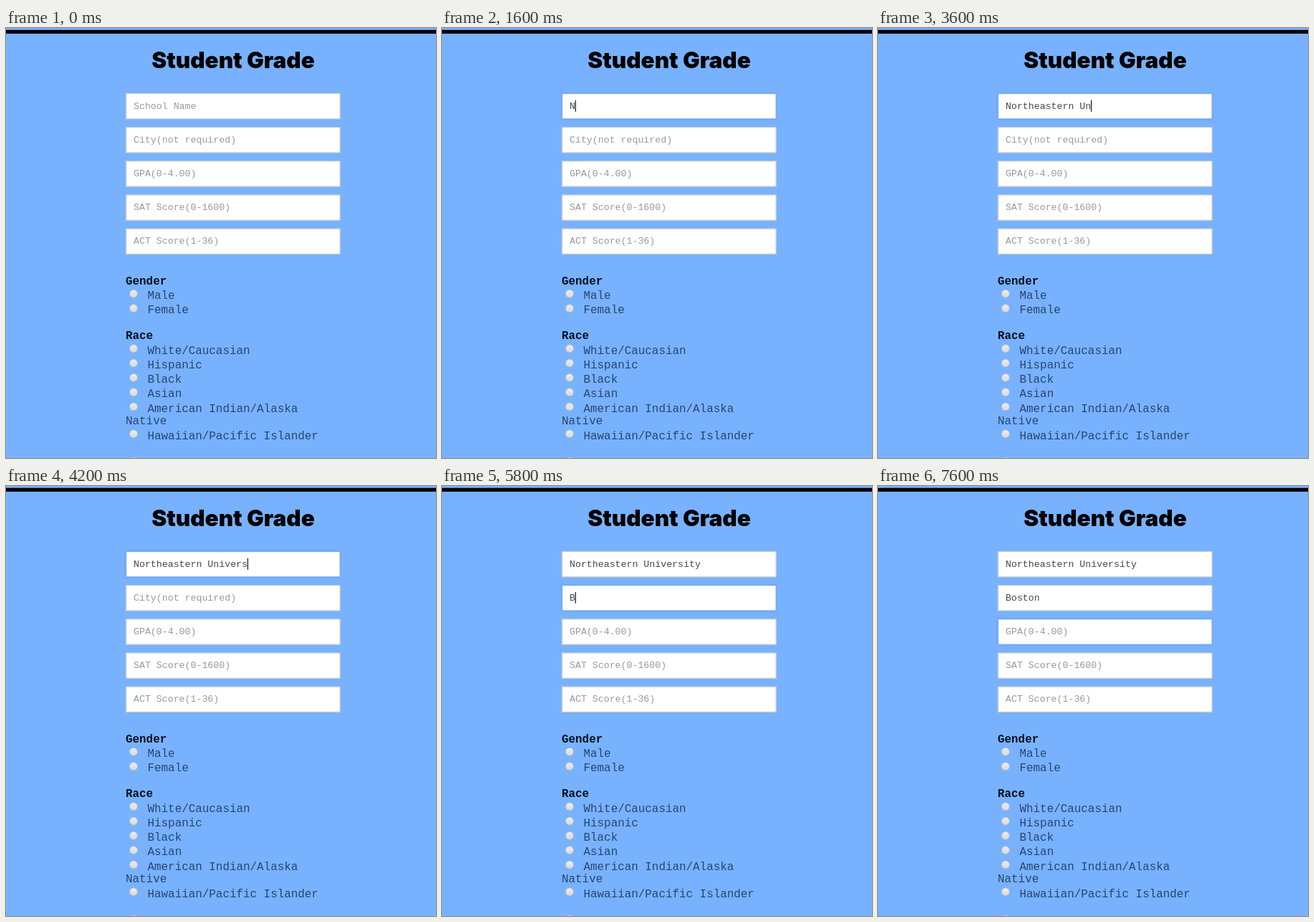
Write an HTML page that moves like this. It is 600 by 600 pixels and loops after 8000 ms.

```html
<!DOCTYPE html>
<html lang="en">
<head>
<meta charset="utf-8">
<title>Score form</title>
<style>
  html, body { margin: 0; width: 100%; height: 100%; overflow: hidden; background: #78b2ff; }
  svg { display: block; width: 600px; height: 600px; }
  text { font: 15.9px "Liberation Mono", monospace; fill: #26456e; white-space: pre; }
  .title { font: 900 31.5px Inter, sans-serif; fill: #000; text-anchor: middle; }
  .head { font-weight: bold; fill: #06101f; }
  .box { fill: #fff; stroke: #ccc; stroke-width: 1.3; }
  .focus .box { stroke: #85b0ee; filter: drop-shadow(0 0 .8px #5c92e0); }
  .value { font-size: 13.25px; fill: #484848; }
  .empty { fill: #999; }
  .radio { fill: url(#knob); stroke: #a8b3c2; stroke-width: .8; }
</style>
</head>
<body>
<svg id="stage" viewBox="0 0 600 600">
  <defs>
    <linearGradient id="knob" x2="0" y2="1">
      <stop stop-color="#eee"/><stop offset="1" stop-color="#d8d8d8"/>
    </linearGradient>
  </defs>
  <rect width="600" height="600" fill="#78b2ff"/>
  <rect y="2.7" width="600" height="5.2"/>
  <text class="title" x="317" y="56.3">Student Grade</text>
</svg>
<script>
const stage = document.getElementById('stage');
const LOOP = 8000, STEP = 200, TEXT_X = 178, CHAR = 7.95;

function add(tag, attrs, parent = stage, content = '') {
  const node = document.createElementNS('http://www.w3.org/2000/svg', tag);
  for (const key in attrs) node.setAttribute(key, attrs[key]);
  node.textContent = content;
  return parent.appendChild(node);
}
const label = (x, y, content, cls = '') => add('text', { x, y, class: cls }, stage, content);
const radio = cy => add('circle', { class: 'radio', cx: 178, cy, r: 5.6 });
function option(y, content) {
  radio(y - 7.2);
  label(197.5, y, content);
}

// start/end: focus span, typeAt: first key, rate: characters per step
const fields = [
  { hint: 'School Name', text: 'Northeastern University', start: 600, end: 4800, typeAt: 1600, rate: 1.47 },
  { hint: 'City(not required)', text: 'Boston', start: 4800, end: 7000, typeAt: 5800, rate: 1 },
  { hint: 'GPA(0-4.00)', start: 7000, end: LOOP },
  { hint: 'SAT Score(0-1600)' },
  { hint: 'ACT Score(1-36)' }
];
fields.forEach((field, i) => {
  const y = 91 + i * 47.15;
  field.group = add('g', {});
  add('rect', { class: 'box', x: 167.6, y: y + .5, width: 298.5, height: 35.3 }, field.group);
  field.value = add('text', { x: TEXT_X, y: y + 21.7 }, field.group);
  field.y = y;
});
const caret = add('rect', { width: 1.1, height: 16 });

label(167, 357.5, 'Gender', 'head');
option(378, 'Male');
option(398.4, 'Female');
label(167, 434, 'Race', 'head');
['White/Caucasian', 'Hispanic', 'Black', 'Asian', 'American Indian/Alaska']
  .forEach((name, i) => option(454.5 + i * 20.3, name));
label(167, 553, 'Native');
option(573.5, 'Hawaiian/Pacific Islander');
radio(604.5);

function typedCount(field, t) {
  if (!field.text || t < field.typeAt) return 0;
  const keys = Math.floor(1 + field.rate * (t - field.typeAt) / STEP + 1e-6);
  return Math.min(field.text.length, keys);
}

function draw(now) {
  const t = Math.floor(now % LOOP / STEP) * STEP;
  caret.setAttribute('visibility', 'hidden');
  for (const field of fields) {
    const count = typedCount(field, t);
    const focused = t >= field.start && t < field.end;
    field.group.setAttribute('class', focused ? 'focus' : '');
    field.value.setAttribute('class', count ? 'value' : 'value empty');
    field.value.textContent = count ? field.text.slice(0, count) : field.hint;
    // The caret blinks off only while the field waits for typing.
    if (focused && (count || t - field.start < 600)) {
      caret.setAttribute('x', TEXT_X + count * CHAR - .2);
      caret.setAttribute('y', field.y + 9.7);
      caret.setAttribute('visibility', 'visible');
    }
  }
  requestAnimationFrame(draw);
}
requestAnimationFrame(draw);
</script>
</body>
</html>
```
